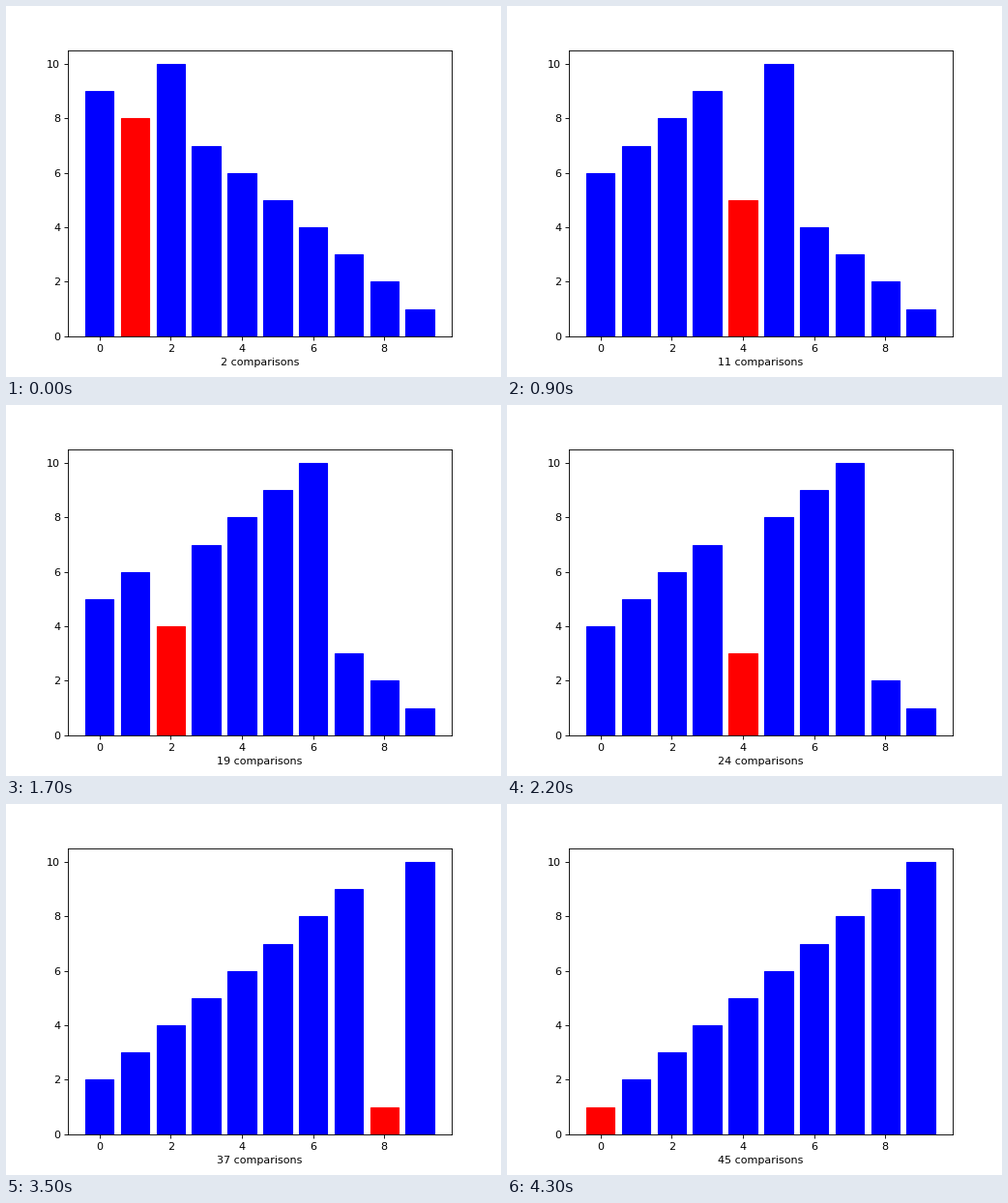
A matplotlib script for the animation above (10 s loop, 512 by 384 pixels).

```python
import matplotlib.pyplot as plt
from matplotlib.animation import FuncAnimation

COUNT = 10
STEP_MS = 100
LOOP_MS = 10000


def insertion_steps(values):
    """List (values, position of the moved item) after each comparison."""
    values = list(values)
    steps = []
    for start in range(1, len(values)):
        for pos in range(start, 0, -1):
            if values[pos - 1] <= values[pos]:
                break
            values[pos - 1], values[pos] = values[pos], values[pos - 1]
            steps.append((values[:], pos - 1))
    return steps


steps = insertion_steps(range(COUNT, 0, -1))

fig, ax = plt.subplots(figsize=(6.4, 4.8), dpi=80)
bars = ax.bar(range(COUNT), range(COUNT, 0, -1), color="blue")
label = ax.set_xlabel("")


def update(frame):
    # The first comparison is never shown; the sorted state holds to the end.
    done = min(frame + 2, len(steps))
    values, moved = steps[done - 1]
    for i, (bar, value) in enumerate(zip(bars, values)):
        bar.set_height(value)
        bar.set_color("red" if i == moved else "blue")
    label.set_text(f"{done} comparisons")
    return [*bars, label]


anim = FuncAnimation(fig, update, frames=LOOP_MS // STEP_MS,
                     interval=STEP_MS, repeat=True, repeat_delay=0)
plt.show()
```
